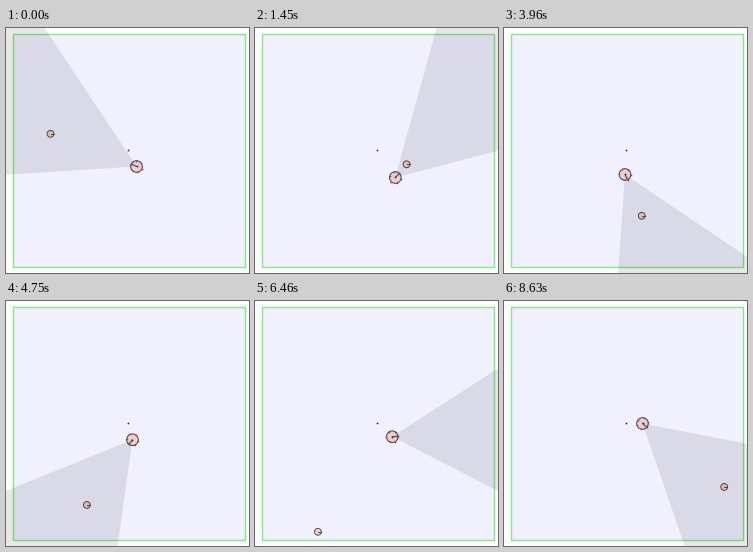
These frames come from a looping animation (243 px wide and 245 px high, 8.68 s). A matplotlib script:

```python
import numpy as np
import matplotlib.pyplot as plt
from matplotlib.animation import FuncAnimation
from matplotlib.patches import Circle, Polygon, Rectangle

W, H, DPI = 243, 245, 100
LOOP, TICK = 8680, 20
STEPS = 188
PX = 72 / DPI
LOW, HIGH = 9.5, 234.5          # walls less the ball's radius
HALF_VIEW = np.radians(30)
RADIUS = 5.8

# Simulation step reached at each clock time (ms)
CLOCK = [0, 30, 940, 1830, 2700, 3580, 4470, 5340, 6230, 7100, 7970, LOOP]
COUNT = [0, 1, 21, 40, 59, 78, 97, 116, 135, 154, 173, STEPS]

# Robot way points: step, x, y
ROUTE = np.array([
    (0, 130, 138), (10, 134, 141.5), (20, 138, 144.5), (32, 139.8, 149),
    (39, 138.5, 152), (54, 132.3, 153), (58, 130.5, 153), (77, 121.5, 150),
    (86, 120.5, 146), (96, 123.5, 140.5), (115, 130.5, 136.7),
    (121, 132.7, 136.5), (134, 136, 135.5), (154, 137.3, 134),
    (172, 138, 128.5), (187, 138, 122)]).T

# Robot heading in degrees: it sweeps after the ball, then spins once
TURN = np.array([
    (0, 153.6), (10, 151), (20, 136), (26, 108), (29, 78), (32, 44.6),
    (35, 13), (37, 4), (39, 11), (41, 13), (47, 4), (54, -3.9), (58, -6),
    (66, -14), (77, -38), (86, -64), (96, -113), (103, -128), (109, -138),
    (115, -146), (121, -150.8), (124, -154), (128, -136), (134, -87),
    (139, -14), (144, 75), (149, 160), (154, 225.2), (158, 250),
    (163, 265), (172, 286.5), (187, 319)]).T


def smooth(n, knots, vals):
    """Cubic Hermite curve through the knots."""
    m = np.gradient(vals, knots)
    i = min(np.searchsorted(knots, n, side="right") - 1, len(knots) - 2)
    h = knots[i + 1] - knots[i]
    u = (n - knots[i]) / h
    return ((1 + 2 * u) * (1 - u) ** 2 * vals[i] + u * (1 - u) ** 2 * h * m[i]
            + u * u * (3 - 2 * u) * vals[i + 1] + u * u * (u - 1) * h * m[i + 1])


def bounce(p):
    span = HIGH - LOW
    return HIGH - abs((p - LOW) % (2 * span) - span)


def polar(center, angle, r):
    return center[0] + r * np.cos(angle), center[1] - r * np.sin(angle)


fig = plt.figure(figsize=(W / DPI, H / DPI), dpi=DPI, facecolor="white")
ax = fig.add_axes([0, 0, 1, 1])
ax.set_xlim(-0.5, W - 0.5)
ax.set_ylim(H - 0.5, -0.5)
ax.axis("off")

ax.add_patch(Rectangle((6, 6), 232, 232, fc="#f0f0ff", ec="#86e886", lw=1.4 * PX))
ax.add_patch(Circle((122, 122), 0.9, fc="#333338", lw=0))

INK = "#4a4048"
ball = ax.add_patch(Circle((0, 0), 3.4, fc="#f2d3c8", ec=INK, lw=0.9 * PX))
needle, = ax.plot([], [], color="#5a3030", lw=0.9 * PX)
robot = ax.add_patch(Circle((0, 0), RADIUS, fc="#f0cccc", ec=INK, lw=PX))
arm, = ax.plot([], [], color=INK, lw=0.9 * PX)
rim, = ax.plot([], [], "o", color="#4c5078", ms=1.6 * PX, mew=0)
tail, = ax.plot([], [], "o", color="#d86060", ms=2.2 * PX, mew=0)
hub, = ax.plot([], [], "o", color="#402828", ms=1.8 * PX, mew=0)
view = ax.add_patch(Polygon(np.zeros((3, 2)), fc="black", alpha=0.095, lw=0))


def update(k):
    t = k * TICK + TICK / 2
    n = min(int(np.interp(t, CLOCK, COUNT) + 0.2), STEPS - 1)

    bx, by = bounce(44 + 3.346 * n), bounce(105.3 + 0.953 * n)
    ball.center = bx, by
    needle.set_data([bx, bx + 3.2], [by, by])

    pos = smooth(n, ROUTE[0], ROUTE[1]), smooth(n, ROUTE[0], ROUTE[2])
    head = np.radians(smooth(n, *TURN))
    robot.center = pos
    tip = polar(pos, head, RADIUS)
    arm.set_data([pos[0], tip[0]], [pos[1], tip[1]])
    rim.set_data(*polar(pos, head + np.arange(6) * np.pi / 3, RADIUS))
    end = polar(pos, head + np.pi, RADIUS)
    tail.set_data([end[0]], [end[1]])
    hub.set_data([pos[0]], [pos[1]])
    view.set_xy([pos, polar(pos, head + HALF_VIEW, 500),
                 polar(pos, head - HALF_VIEW, 500)])
    return ball, needle, robot, arm, rim, tail, hub, view


anim = FuncAnimation(fig, update, frames=LOOP // TICK, interval=TICK,
                     repeat=True, repeat_delay=0)
plt.show()
```
